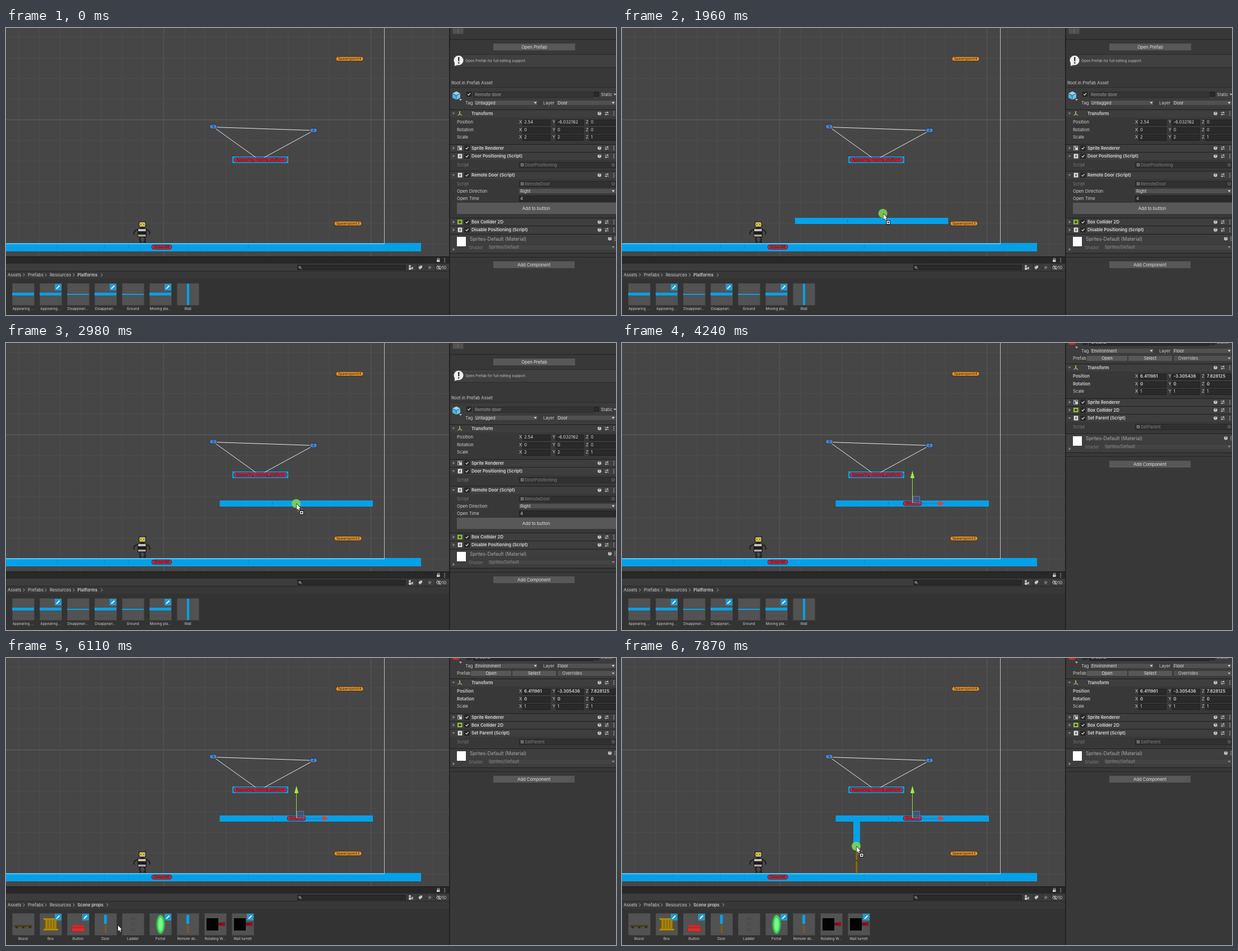
These frames come from a looping animation (1089 px wide and 514 px high, 8 s). An HTML page with a canvas:

```html
<!DOCTYPE html>
<html lang="en">
<head>
<meta charset="utf-8">
<title>Level editor</title>
<style>
html, body { margin: 0; width: 100%; height: 100%; overflow: hidden; background: #383838; }
canvas { display: block; width: 1089px; height: 514px; }
</style>
</head>
<body>
<canvas id="stage" width="1089" height="514"></canvas>
<script>
const LOOP = 8000, DROP = 3680, FOLDER = 4950;
const BLUE = '#05a1e8', UI = 'Inter, "Liberation Sans", sans-serif', TAGS = '"DejaVu Sans", sans-serif';
const g = document.getElementById('stage').getContext('2d');

// Cursor moves: start, step length, keys [step, x, y], easing power, step from which the button is down
const moves = [
  { at: 380, dt: 78, keys: [[0, 404, 464], [10, 225, 483]], pow: 1.6, press: 10 },
  { at: 1240, dt: 80, keys: [[0, 236, 477], [3, 343, 408], [4, 364, 397], [10, 486, 319]], press: 0, drag: 'platform' },
  { at: 2120, dt: 78, keys: [[0, 487, 318], [4, 495, 303], [10, 516, 288], [11, 518, 287.5]], press: 0, drag: 'platform' },
  { at: DROP, dt: 80, keys: [[0, 518, 288], [6, 57, 460], [7, -40, 490]] },
  { at: 5490, dt: 78, keys: [[0, 17, 503], [8, 199, 478], [10, 221, 476]] },
  { at: 6350, dt: 80, keys: [[0, 223, 476], [10, 317, 481]], pow: 1.6 },
  { at: 7310, dt: 80, keys: [[0, 316, 483], [7, 418, 337]], pow: 1.3, press: 0, drag: 'door' }
];

function cursorAt(t) {
  const m = moves.filter(v => v.at <= t).pop();
  if (!m) return null;
  const last = m.keys[m.keys.length - 1];
  const step = Math.min(last[0], Math.floor((t - m.at) / m.dt + 0.1));
  const n = Math.max(1, m.keys.findIndex(k => k[0] >= step));
  const a = m.keys[n - 1], b = m.keys[n];
  let k = (step - a[0]) / (b[0] - a[0]);
  if (m.pow) k = 1 - Math.pow(1 - k, m.pow);
  return { x: a[1] + (b[1] - a[1]) * k, y: a[2] + (b[2] - a[2]) * k, drag: m.drag, down: step >= m.press };
}

function box(x, y, w, h, fill, edge) {
  g.fillStyle = fill;
  g.fillRect(x, y, w, h);
  if (edge) { g.strokeStyle = edge; g.lineWidth = 1; g.strokeRect(x + 0.5, y + 0.5, w - 1, h - 1); }
}
function line(color, width, ...p) {
  g.strokeStyle = color;
  g.lineWidth = width;
  g.beginPath();
  for (let i = 0; i < p.length; i += 2) g.lineTo(p[i], p[i + 1]);
  g.stroke();
}
function poly(fill, ...p) {
  g.fillStyle = fill;
  g.beginPath();
  for (let i = 0; i < p.length; i += 2) g.lineTo(p[i], p[i + 1]);
  g.fill();
}
function oval(x, y, rx, ry, fill) {
  g.fillStyle = fill;
  g.beginPath();
  g.ellipse(x, y, rx, ry, 0, 0, 7);
  g.fill();
}
function ring(x, y, r, color, width = 1) {
  g.strokeStyle = color;
  g.lineWidth = width;
  g.beginPath();
  g.arc(x, y, r, 0, 7);
  g.stroke();
}
// y is the middle of the capitals
function text(s, x, y, { size = 7.7, color = '#cfcfcf', bold = false, align = 'left', font = UI } = {}) {
  g.font = `${bold ? 600 : 400} ${size}px ${font}`;
  g.textAlign = align;
  g.fillStyle = color;
  g.fillText(s, x, y + size * 0.36);
}
function arrow(x, y, dir = 'down', color = '#b4b4b4') {
  if (dir === 'down') poly(color, x - 2.5, y - 1.5, x + 2.5, y - 1.5, x, y + 2);
  else poly(color, x - 1.5, y - 3, x + 2.5, y, x - 1.5, y + 3);
}

// ---------- scene ----------
function pill(s, x, y, w, fill) {
  g.beginPath();
  g.roundRect(x - w / 2, y - 3.9, w, 7.8, 3.9);
  g.fillStyle = fill;
  g.fill();
  g.strokeStyle = 'rgba(50,22,18,.7)';
  g.lineWidth = 1;
  g.stroke();
  text(s, x, y - 0.3, { size: 6.35, color: '#241818', align: 'center', font: TAGS });
}
function robot() {
  box(237, 346, 13, 11, '#262422');
  box(238.5, 347.5, 10, 8.5, '#aba692');
  for (const x of [240.8, 246]) { oval(x, 351.8, 2.6, 2.8, '#e8cf28'); oval(x, 351.8, 1, 1.1, '#4b430f'); }
  box(240, 357, 7, 3, '#1f1d1c');
  box(235, 359, 16, 16, '#1f1d1c');
  box(236, 360, 13.5, 4, '#c5c2bd');
  box(236, 370, 13.5, 3.5, '#aaa7a2');
  line('#24201e', 2, 235, 361, 230, 363, 228, 367, 229, 370);
  line('#24201e', 2, 251, 361, 255, 363, 257, 367, 256, 370);
  line('#24201e', 2.2, 240, 374, 238.5, 379, 241, 383.5);
  line('#24201e', 2.2, 246, 374, 249, 379, 246.5, 383.5);
  box(238, 382, 4.5, 2.5, '#24201e');
  box(245, 382, 5, 2.5, '#24201e');
}
function platform(x, y) {
  const top = Math.round(y - 5.5);
  box(x - 136.5, top, 273.5, 11, BLUE);
  box(Math.round(x - 43), top + 3, 1, 5, 'rgba(20,70,110,.45)');
}
function door(x, y) {
  const left = Math.round(x - 5.5), top = Math.round(y - 45);
  box(left, top, 12, 47, BLUE);
  box(left + 4, top + 47, 4, 46, '#71590f');
  box(left + 5, top + 47, 1.2, 46, '#94761b');
  box(left + 3, top + 47, 6, 4, '#71590f');
  box(left + 3, top + 69, 6, 2, '#4f3d0c');
}
function gizmo() {
  pill('Ground', 518.5, 287.2, 33, '#bf2c40');
  box(519, 274, 13, 13, 'rgba(70,100,190,.35)', '#5278c4');
  line('rgba(110,80,110,.7)', 1, 536, 287.5, 565, 287.5);
  poly('#dd4335', 564.5, 282.7, 577, 287.3, 564.5, 291.8);
  line('#93dc3e', 1, 518.5, 287, 518.5, 242);
  poly('#9df043', 514.8, 242, 522.2, 242, 518.5, 229);
}
function scene(t, cur) {
  g.save();
  g.beginPath();
  g.rect(0, 0, 791, 409);
  g.clip();
  box(0, 0, 791, 409, '#464646');
  for (let i = -7; i < 14; i++) box(281 + i * 37, 0, 1, 409, i % 10 ? '#4d4d4d' : '#585858');
  for (let i = -4; i < 7; i++) box(0, 164 + i * 37, 791, 1, i ? '#4d4d4d' : '#606060');
  box(0, 385, 741, 15, BLUE);
  for (const x of [91, 175, 218, 432]) box(x, 387, 1, 10, 'rgba(20,70,110,.16)');
  robot();
  line('rgba(220,220,220,.8)', 1, 0, 386.5, 675.5, 386.5, 675.5, 0);
  box(404, 230, 100, 12, BLUE);
  line('#ececec', 1, 370.5, 177.5, 549.5, 183.5, 452.5, 236.5, 370.5, 177.5);
  pill('Appearing moving platform', 454, 236, 95, '#bf2c40');
  pill('Groundd', 278, 392.3, 36, '#bf2c40');
  pill('Spawnpoint4', 613.5, 55.2, 49, '#e0962c');
  pill('Spawnpoint3', 610.5, 350, 49, '#e0962c');
  pill('3', 370, 176.7, 13, '#4286cf');
  pill('2', 549, 183.3, 13, '#4286cf');
  if (t >= DROP) { platform(518, 287.5); gizmo(); }
  if (cur && cur.drag === 'platform') {
    // The preview trails the cursor while it enters the scene
    const p = t < 2120 ? cursorAt(t - 80) : cur;
    if (p.y < 408.5) platform(p.x, p.y);
  }
  if (cur && cur.drag === 'door' && cur.y < 408) door(cur.x, cur.y + 0.7);
  g.restore();
}

// ---------- project browser ----------
function doorThumb(x) {
  box(x + 17, 460, 5, 16, BLUE);
  box(x + 18.5, 476, 2.5, 17, '#7b5f14');
}
function turretThumb(x) {
  box(x + 24, 474, 13, 5, '#7c0c1c');
  box(x + 32, 473, 5, 7, '#8f1022');
  box(x + 4, 466, 21, 22, '#030303');
}
const bar = h => x => box(x, Math.round(476.5 - h / 2), 39, h, BLUE);
const platforms = [
  ['Appearing ...', bar(5)], ['Appearing...', bar(5), 1], ['Disappeari...', bar(2)], ['Disappeari...', bar(5), 1],
  ['Ground', bar(2)], ['Moving pla...', bar(5), 1], ['Wall', x => box(x + 18, 458, 4, 38, BLUE)]
];
const props = [
  ['Boost', x => {
    box(x + 4, 478, 32, 4, '#47421f');
    for (const d of [6, 18, 30]) box(x + d, 481, 4, 3, '#2e2b17');
  }],
  ['Box', x => {
    box(x + 8, 465, 24, 24, '#7e6409', '#664f07');
    for (let i = 0; i < 4; i++) box(x + 11 + i * 5, 468, 3.5, 18, '#a3830f');
    box(x + 7, 466, 26, 3, '#a98a14');
    box(x + 7, 485, 26, 3, '#a98a14');
  }, 1],
  ['Button', x => {
    box(x + 10, 478, 20, 5, '#cf2626');
    box(x + 8, 483, 24, 7, '#d92f2f', '#b02020');
  }, 1],
  ['Door', doorThumb],
  ['Ladder', x => {
    for (let i = 0; i < 3; i++) for (const d of [17, 21]) box(x + d, 464 + i * 10, 1.5, 5, '#424747');
  }],
  ['Portal', x => {
    oval(x + 20, 477, 8.5, 18, 'rgba(60,230,90,.35)');
    oval(x + 20, 477, 6.5, 16, '#35e05a');
    oval(x + 20, 477, 4, 12, '#7df58c');
  }, 1],
  ['Remote do...', doorThumb], ['Rotating W...', turretThumb], ['Wall turrett', turretThumb, 1]
];

function thumb([name, art, badge], i) {
  const x = 11 + i * 49;
  box(x, 457, 40, 40, '#525252', '#444');
  art(x);
  if (badge) {
    box(x + 27, 458, 12, 12, '#2398cd');
    line('#fff', 2, x + 31, 466, x + 35.5, 461.5);
    poly('#fff', x + 29.5, 467.5, x + 30.2, 465, x + 32, 466.8);
  }
  text(name, x + 19.5, 503, { size: 6.3, align: 'center' });
}
function project(t) {
  const inProps = t >= FOLDER;
  box(0, 409, 791, 105, '#333');
  box(0, 409, 791, 13, '#282828');
  box(0, 409, 791, 1, '#181818');
  box(0, 422, 791, 14, '#3c3c3c');
  box(0, 435, 791, 1, '#262626');
  box(0, 436, 791, 13, '#383838');
  // Lock and menu
  box(769, 415, 5.5, 4, '#c4c4c4');
  ring(772, 414, 1.8, '#c4c4c4');
  dots(783, 416);
  // Search bar and filters
  box(520, 424, 194, 10, '#292929', '#202020');
  ring(524.5, 428.5, 1.6, '#c4c4c4');
  line('#c4c4c4', 1, 525.7, 429.7, 527.5, 431.5);
  for (const x of [717, 733.5, 750, 766]) box(x, 422, 1, 13, '#2f2f2f');
  oval(721, 426.5, 2, 2, '#c4c4c4');
  box(719, 429, 4.5, 4, '#c4c4c4');
  poly('#c4c4c4', 723, 430, 726.5, 427, 726.5, 433);
  poly('#c4c4c4', 736, 429, 739.5, 425.5, 743, 425.5, 743, 429, 739, 432.5);
  const star = [];
  for (let i = 0; i < 10; i++) {
    const a = i * Math.PI / 5 - Math.PI / 2, r = i % 2 ? 1.7 : 4;
    star.push(756.5 + r * Math.cos(a), 429 + r * Math.sin(a));
  }
  poly('#777', ...star);
  g.strokeStyle = '#c4c4c4';
  g.lineWidth = 1;
  g.beginPath();
  g.ellipse(773, 429, 4.2, 2.6, 0, 0, 7);
  g.stroke();
  oval(773, 429, 1.4, 1.4, '#c4c4c4');
  line('#c4c4c4', 1, 769.5, 425, 776.5, 433);
  text('10', 778, 429);
  // Path
  text('Assets', 3, 442);
  text('Prefabs', 39, 442);
  text('Resources', 78, 442);
  text(inProps ? 'Scene props' : 'Platforms', 127.5, 442, { bold: true });
  for (const x of [32, 71, 121, inProps ? 181 : 171]) line('#a8a8a8', 1, x - 1.5, 439.5, x + 1.2, 442.3, x - 1.5, 445);
  (inProps ? props : platforms).forEach(thumb);
}

// ---------- inspector ----------
function dots(x, y) {
  for (const d of [-3, 0, 3]) box(x - 0.6, y + d - 0.6, 1.4, 1.4, '#c4c4c4');
}
function help(x, y) {
  oval(x, y, 3.3, 3.3, '#c4c4c4');
  text('?', x, y, { size: 5.5, bold: true, color: '#333', align: 'center' });
}
function check(x, y, on = true) {
  box(x - 4.5, y - 4.5, 9, 9, '#2a2a2a', '#1c1c1c');
  if (on) line('#d8d8d8', 1.2, x - 2.4, y, x - 0.6, y + 1.9, x + 2.6, y - 2.2);
}
function button(s, x, y, w, h, tx = x + w / 2) {
  box(x, y, w, h, '#585858', '#3a3a3a');
  text(s, tx, y + h / 2, { color: '#e4e4e4', align: 'center' });
}
function dropdown(s, x, y, w, color = '#dcdcdc', fill = '#505050') {
  box(x, Math.round(y - 5), w, 10, fill, '#3a3a3a');
  text(s, x + 3, y, { color });
  arrow(Math.min(x + w, 1089) - 5, y, 'down', color);
}
function field(x, y, w, fill = '#2a2a2a', edge = '#202020') {
  box(x, Math.round(y - 5), w, 11, fill, edge);
}
const icons = {
  axes(y) {
    line('#b9cf42', 1.6, 810, y + 1, 810, y - 4);
    line('#4fa3e0', 1.6, 810, y + 1, 806.5, y + 3.5);
    line('#e08a3c', 1.6, 810, y + 1, 814, y + 3.5);
  },
  sprite(y) {
    g.strokeStyle = '#a8b4bc';
    g.lineWidth = 1;
    g.strokeRect(806.5, y - 3.5, 7, 7);
    oval(811.5, y + 1, 2.6, 2.6, '#c8d0d6');
    oval(809, y - 1.5, 1.2, 1.2, '#c8d0d6');
  },
  script(y, x = 810.5, s = 1) {
    box(x - 3.8 * s, y - 4 * s, 7.6 * s, 8 * s, s < 1 ? '#808080' : '#e9e9e9');
    text('#', x, y, { size: 6.5 * s, bold: true, color: '#3a3a3a', align: 'center' });
  },
  collider(y) {
    box(806, y - 4, 8.5, 8, '#9fca3f');
    box(808, y - 2, 4.5, 4, '#3c4a20');
  }
};
function header(y, title, icon, open, toggle = true) {
  const top = Math.round(y - 7.5);
  box(792, top, 297, 14, '#3e3e3e');
  box(792, top, 297, 1, '#1f1f1f');
  arrow(799, y, open ? 'down' : 'right', '#808080');
  icons[icon](y);
  if (toggle) check(823, y);
  text(title, 831, y, { bold: true, color: '#dedede' });
  help(1059.5, y);
  line('#c4c4c4', 1, 1069, y - 1.7, 1076, y - 1.7);
  line('#c4c4c4', 1, 1069, y + 1.8, 1076, y + 1.8);
  box(1073, y - 3.2, 1.4, 3, '#c4c4c4');
  box(1070.4, y + 0.4, 1.4, 3, '#c4c4c4');
  dots(1085, y);
}
function vector(label, y, values, bold) {
  text(label, 805, y, { bold });
  [[916, 'X'], [975.5, 'Y'], [1035, 'Z']].forEach(([x, axis], i) => {
    text(axis, x, y);
    field(x + 6, y, 50);
    text(values[i], x + 9, y, { bold, color: '#d8d8d8' });
  });
}
function transform(y, pos, rot, scale, bold) {
  header(y, 'Transform', 'axes', true, false);
  vector('Position', y + 15.5, pos, bold);
  vector('Rotation', y + 29.5, rot, bold);
  vector('Scale', y + 42.7, scale, false);
}
function scriptRow(y, name) {
  text('Script', 805, y, { color: '#7b7b7b' });
  field(916, y, 173, '#303030', '#282828');
  icons.script(y, 921.5, 0.7);
  text(name, 926, y, { color: '#808080' });
  ring(1084, y, 2.8, '#777', 0.8);
  oval(1084, y, 1, 1, '#777');
}
function material(y) {
  box(792, y - 9, 297, 1, '#222');
  box(792, y - 8, 297, 32, '#3e3e3e');
  box(805, y - 4, 16, 17, '#fff');
  text('Sprites-Default (Material)', 828, y, { size: 8.45, color: '#ababab' });
  help(1078, y - 0.7);
  dots(1087, y - 0.7);
  text('Shader', 826, y + 15, { color: '#777' });
  dropdown('Sprites/Default', 859, y + 14.5, 230, '#8c8c8c', '#444');
  arrow(799, y + 18.5, 'right', '#808080');
  box(792, y + 25, 297, 1, '#242424');
  box(792, y + 32, 297, 1, '#242424');
  button('Add Component', 869, y + 39, 147, 14);
}
function tagRow(y, tag, layer) {
  text('Tag', 820, y);
  dropdown(tag, 835, y, 115);
  text('Layer', 959, y);
  dropdown(layer, 982, y, 107);
}
function prefabPanel() {
  box(797, 0, 20, 11, '#515151', '#444');
  box(806, 1, 1.5, 3, '#b0483c');
  box(806, 5, 1.5, 3, '#3d7fa8');
  box(792, 20, 297, 1, '#232323');
  button('Open Prefab', 869, 27, 148, 14);
  box(797, 47, 296, 24, '#404040', '#2b2b2b');
  oval(808, 58, 8.5, 8.5, '#f0f0f0');
  poly('#f0f0f0', 801, 62, 801, 68, 807, 66);
  box(807, 52, 2.4, 7.5, '#333');
  box(807, 61.3, 2.4, 2.4, '#333');
  text('Open Prefab for full editing support.', 820, 59, { size: 6.4, color: '#bdbdbd' });
  text('Root in Prefab Asset', 795, 98);
  box(792, 106, 297, 1, '#2c2c2c');
  box(792, 107, 297, 38, '#3c3c3c');
  poly('#8ad4fa', 797, 117, 804, 113.5, 811, 117, 804, 120.5);
  poly('#4fb0e4', 797, 117.8, 803.6, 121.2, 803.6, 128.5, 797, 125);
  poly('#6cc4f2', 811, 117.8, 804.4, 121.2, 804.4, 128.5, 811, 125);
  arrow(811.5, 128.5);
  check(826.5, 118.5);
  field(834, 118.5, 215, '#343434', '#2b2b2b');
  text('Remote door', 837, 119, { bold: true, color: '#858585' });
  check(1054.5, 118.5, false);
  text('Static', 1062, 119);
  arrow(1087, 119);
  tagRow(134, 'Untagged', 'Door');
  transform(153, ['2.54', '-6.032162', '0'], ['0', '0', '0'], ['2', '2', '1'], false);
  header(215, 'Sprite Renderer', 'sprite', false);
  header(229.5, 'Door Positioning (Script)', 'script', true);
  scriptRow(245, 'DoorPositioning');
  header(263.5, 'Remote Door (Script)', 'script', true);
  scriptRow(279, 'RemoteDoor');
  text('Open Direction', 805, 292);
  dropdown('Right', 915, 292, 174);
  text('Open Time', 805, 305);
  field(916, 305, 173);
  text('4', 918, 305);
  button('Add to button', 804, 312, 290, 22, 946.5);
  header(347.5, 'Box Collider 2D', 'collider', false);
  header(361.5, 'Disable Positioning (Script)', 'script', false);
  material(378);
}
function groundPanel() {
  box(792, 0, 297, 36, '#3c3c3c');
  oval(803.5, -1, 7, 4.5, '#d0242c');
  arrow(811.5, 8);
  box(822, 0, 9, 4, '#2a2a2a');
  field(834, -1.5, 215);
  text('Ground', 837, -1.5, { bold: true });
  box(1050, 0, 9, 4, '#2a2a2a');
  text('Static', 1062, -1.5);
  tagRow(14, 'Environment', 'Floor');
  text('Prefab', 805, 27.5);
  button('Open', 829, 22, 74, 11);
  button('Select', 903, 22, 80, 11);
  box(984, 22, 105, 11, '#505050', '#3a3a3a');
  text('Overrides', 993, 27.5);
  arrow(1084, 27.5);
  transform(44, ['6.411961', '-3.305436', '7.828125'], ['0', '0', '0'], ['1', '1', '1'], true);
  header(106, 'Sprite Renderer', 'sprite', false);
  header(120, 'Box Collider 2D', 'collider', false);
  header(134.5, 'Set Parent (Script)', 'script', true);
  scriptRow(150, 'SetParent');
  material(171);
}

function pointer({ x, y, drag, down }) {
  if (down) oval(x, y, 8, 8, 'rgba(128,212,82,.88)');
  if (drag) {
    g.setLineDash([1, 1]);
    g.strokeStyle = '#999';
    g.lineWidth = 1;
    g.strokeRect(x + 2.5, y + 8.5, 8, 6);
    g.setLineDash([]);
    box(x + 6, y + 12.5, 7.5, 7.5, '#111');
    box(x + 7, y + 13.5, 5.5, 5.5, '#fff');
    box(x + 8, y + 15.7, 3.5, 1.1, '#111');
    box(x + 9.2, y + 14.5, 1.1, 3.5, '#111');
  }
  const shape = [[0, 0], [0, 11], [2.5, 8.8], [4.3, 12.8], [6, 12], [4.3, 8.2], [7.6, 8]];
  g.beginPath();
  for (const [dx, dy] of shape) g.lineTo(x + 1 + dx * 0.9, y + 1 + dy * 0.9);
  g.closePath();
  g.strokeStyle = '#111';
  g.lineWidth = 1.2;
  g.stroke();
  g.fillStyle = '#fff';
  g.fill();
}

function draw(now) {
  const t = now % LOOP, cur = cursorAt(t);
  box(0, 0, 1089, 514, '#383838');
  scene(t, cur);
  project(t);
  if (t < DROP) prefabPanel(); else groundPanel();
  box(791, 0, 1.5, 514, '#1b1b1b');
  if (cur) pointer(cur);
}
const start = performance.now();
function tick() {
  draw(performance.now() - start);
  requestAnimationFrame(tick);
}
tick();
</script>
</body>
</html>
```
